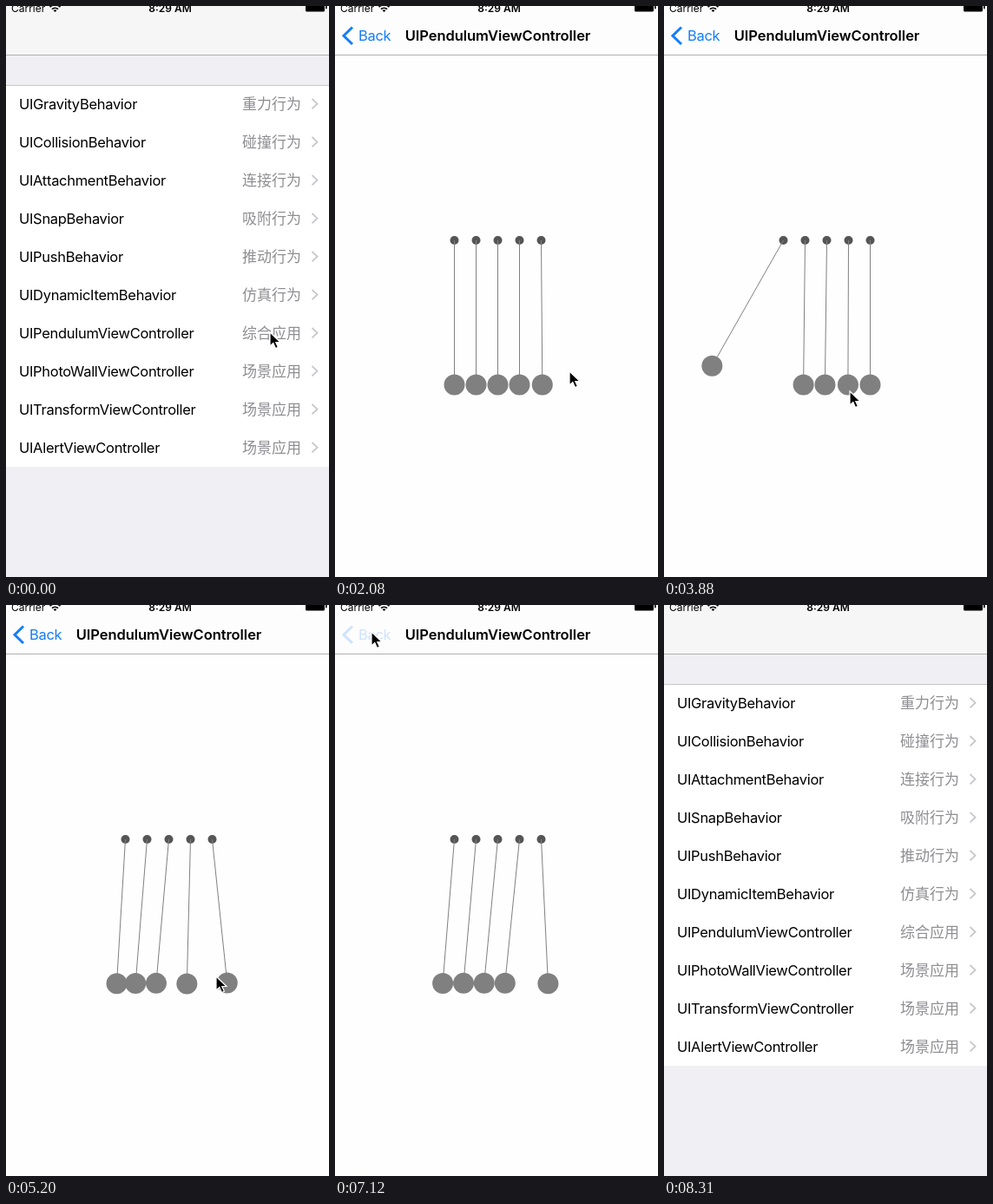
Animation of 372 by 658 pixels, one loop 8.61 s. Source, as an HTML page:

```html
<!DOCTYPE html>
<html lang="en">
<head>
<meta charset="utf-8">
<title>Pendulum demo</title>
<style>
html, body { margin: 0; width: 100%; height: 100%; overflow: hidden; background: #fefefe; }
svg { display: block; width: 372px; height: 658px; }
text { font-family: Inter, Roboto, sans-serif; font-size: 16.5px; letter-spacing: -0.3px; }
.note { font-family: "Noto Sans CJK SC", "Noto Sans CJK", sans-serif; font-size: 17px; letter-spacing: 0; fill: #8e8e93; }
.title { font-weight: 600; letter-spacing: -0.05px; }
.status { font-size: 12px; letter-spacing: 0; }
</style>
</head>
<body>
<svg viewBox="0 0 372 658">
  <g id="list">
    <rect y="56" width="490" height="602" fill="#efeff4"/>
    <rect y="91" width="490" height="440" fill="#fff"/>
    <rect id="mark" y="355" width="490" height="44" fill="#dcdcdc"/>
    <rect y="91" width="490" height="1" fill="#c8c7cc"/>
    <g id="rows"></g>
  </g>
  <rect id="dim" y="56" width="372" height="602"/>
  <g id="panel">
    <rect y="56" width="372" height="602" fill="#fefefe"/>
    <g id="cradle"></g>
  </g>
  <rect width="372" height="56" fill="#f6f6f7"/>
  <rect id="bar" width="372" height="56" fill="#fdfdfd"/>
  <rect y="56" width="372" height="1" fill="#b0b0b0"/>
  <path id="arrow" d="M20 24.5 10 34.2 20 44" fill="none" stroke="#147efb" stroke-width="3"/>
  <text id="back" x="27" y="40" fill="#147efb">Back</text>
  <text id="title" class="title" x="187.5" y="40" text-anchor="middle">UIPendulumViewController</text>
  <text class="status" x="6" y="6.5">Carrier</text>
  <path d="M50.5 1.2a8.5 8.5 0 0 1 12 0M53 3.7a5 5 0 0 1 7 0" fill="none" stroke="#000" stroke-width="1.7"/>
  <path d="M54.6 5.1a2.8 2.8 0 0 1 3.8 0L56.5 7z"/>
  <text class="status" x="189" y="6.5" text-anchor="middle" font-weight="600">8:29 AM</text>
  <rect x="345" y="-4" width="22" height="10.5" rx="1.5"/>
  <rect x="368" y="-1" width="1.6" height="4.5" rx=".8"/>
  <path id="cursor" d="M0 0V16l3.8-3.4 2.6 6 3-1.3-2.6-5.8H12z" stroke="#fff" stroke-width="1.2"/>
</svg>
<script>
const $ = id => document.getElementById(id);
const LOOP = 8610, START = 590, STEP = 148.4;
const TOP = 270, LENGTH = 166.5, PULL = 2.03, RELEASE = 2.79;

function set(el, attrs) {
  for (const key in attrs) el.setAttribute(key, attrs[key]);
}
function add(parent, tag, attrs, content) {
  const el = document.createElementNS("http://www.w3.org/2000/svg", tag);
  set(el, attrs);
  if (content) el.textContent = content;
  return parent.appendChild(el);
}
const move = (id, x, y = 0) => set($(id), { transform: `translate(${x} ${y})` });
const fade = (id, opacity) => set($(id), { opacity });
const clamp = v => Math.min(1, Math.max(0, v));
const progress = (t, from, to) => clamp((t - from) / (to - from));
const smooth = v => v * v * (3 - 2 * v);

const kinds = { Gravity: "重力", Collision: "碰撞", Attachment: "连接", Snap: "吸附", Push: "推动", DynamicItem: "仿真" };
const scenes = { Pendulum: "综合", PhotoWall: "场景", Transform: "场景", Alert: "场景" };
const rows = [
  ...Object.entries(kinds).map(([k, v]) => [`UI${k}Behavior`, v + "行为"]),
  ...Object.entries(scenes).map(([k, v]) => [`UI${k}ViewController`, v + "应用"])
];
rows.forEach(([name, note], i) => {
  const y = 119 + 44 * i;
  add($("rows"), "text", { x: 15, y }, name);
  add($("rows"), "text", { x: 340, y, class: "note", "text-anchor": "end" }, note);
  add($("rows"), "path", {
    d: `M352.5 ${y - 12}l6 5.7-6 5.7`, fill: "none", stroke: "#c7c7cc", "stroke-width": 1.8
  });
});

const balls = [0, 1, 2, 3, 4].map(i => {
  const x = 137.5 + 25 * i, g = $("cradle");
  add(g, "circle", { cx: x, cy: TOP, r: 5, fill: "#555" });
  return {
    x,
    rod: add(g, "line", { x1: x, y1: TOP, stroke: "#808080", "stroke-width": 1 }),
    bob: add(g, "circle", { r: 12, fill: "#808080" })
  };
});

// Damped swing of the outer balls, in degrees: positive right, negative left.
function swing(t) {
  if (t < RELEASE) return 46 * smooth(progress(t, PULL, RELEASE));
  const u = t - RELEASE;
  return 46 * Math.exp(-0.3 * u) * Math.cos(u * 481 * Math.PI / 180);
}

// The inner balls gradually start to sway together.
function angles(t) {
  const s = swing(t), late = progress(t, 5.19, 7.12);
  const sway = -4.8 * progress(t, 3.6, 5.2) * Math.cos(2 * Math.PI * (t - 5.19) / 0.643);
  const b = sway * (0.96 + 0.08 * late);
  const c = sway * (1.05 + 0.08 * late);
  const d = Math.max(sway * (0.3 + 0.9 * late), c - 0.5);
  return [Math.min(s, 0, sway * (0.72 + 0.24 * late)), b, c, d, Math.max(s, 0, d)];
}

// Hand movements: start, end (seconds), then where the pointer comes to rest.
const glides = [
  [0.74, 1.5, 240, 430], [1.63, 2.07, 270, 421], [2.07, 2.6, 352, 420],
  [2.6, 3.85, 214, 444], [3.85, 5.19, 242, 428], [5.4, 6.5, 42, 31], [7.4, 7.7, 60, -25]
];
function pointer(t) {
  let x = 304, y = 376;
  for (const [from, to, nx, ny] of glides) {
    const k = smooth(progress(t, from, to));
    x += (nx - x) * k;
    y += (ny - y) * k;
  }
  return [x, y];
}

// 1 at launch, settling to 0.
function settle(t) {
  const u = Math.max(0, t) * 18;
  return (1 + u) * Math.exp(-u);
}

function draw(ms) {
  const pushed = ms >= START;
  const t = pushed ? (START + STEP * Math.floor((ms - START) / STEP)) / 1000 : 0;
  const p = t < 7.2 ? settle(t - 0.57) : 1 - settle(t - 7.225);
  const x = 372 * p;

  move("list", -111.6 * (1 - p));
  fade("dim", 0.1 * (1 - p));
  move("panel", x);
  move("bar", x * 1.28);
  fade("mark", pushed ? 1 - progress(t, 7.2, 7.68) : 0);

  const backAlpha = Math.min(t < 6.95 ? 1 : 0.2, clamp(1 - 4.4 * p));
  fade("arrow", backAlpha);
  fade("back", backAlpha);
  move("back", 145 * p);
  move("title", 340 * p);
  fade("title", 1 - p);

  angles(t).forEach((deg, i) => {
    const a = deg * Math.PI / 180, { x: left, rod, bob } = balls[i];
    const cx = left + LENGTH * Math.sin(a), cy = TOP + LENGTH * Math.cos(a);
    set(rod, { x2: cx, y2: cy });
    set(bob, { cx, cy });
  });

  move("cursor", ...pointer(t));
}

const begin = performance.now();
function tick() {
  draw((performance.now() - begin) % LOOP);
  requestAnimationFrame(tick);
}
tick();
</script>
</body>
</html>
```
